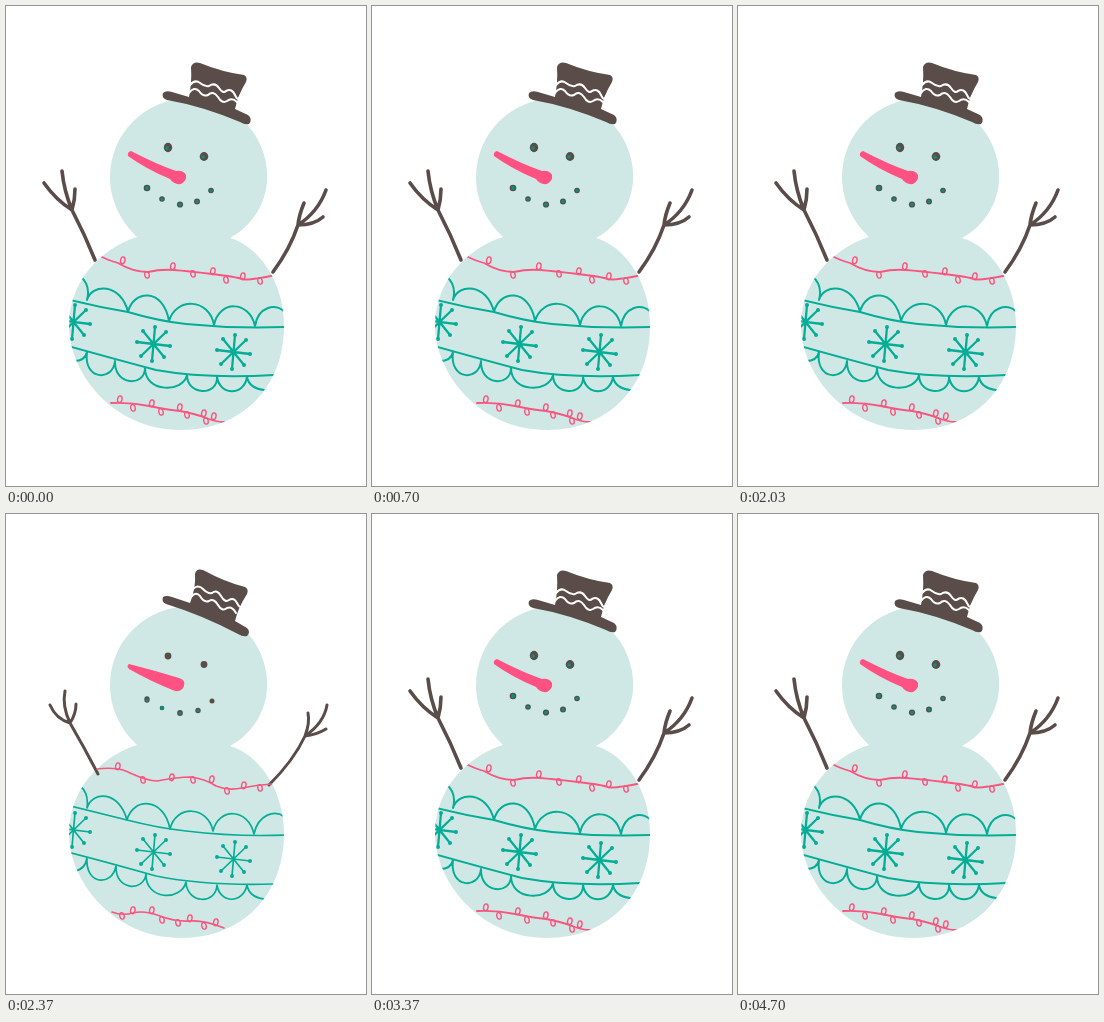
Animation, 360 px wide and 480 px high, one loop 5.03 s. Source, as an HTML page without scripts:

```html
<!DOCTYPE html>
<html lang="en">
<head>
<meta charset="utf-8">
<title>Snowman</title>
<style>
html, body { margin: 0; width: 100%; height: 100%; overflow: hidden; background: #fff; }
svg { display: block; width: 100vw; height: 100vh; }
path, .line { stroke-linecap: round; stroke-linejoin: round; }
.snow { fill: #cfe8e5; }
.dark { fill: #5a4c48; }
.pink { fill: #ff5283; }
.line { fill: none; }
.twig { stroke: #5a4c48; stroke-width: 3.6; }
.teal { stroke: #05ad97; stroke-width: 2; }
.string { stroke: #f9567f; stroke-width: 1.8; }
.loops { stroke: #f9567f; stroke-width: 1.4; }
.wave { stroke: #fff; stroke-width: 2; }
.glint { fill: #05917f; }
.a .flakes { stroke-width: 2.3; }
.b .twig { stroke-width: 3; }
.b .teal { stroke-width: 1.7; }
.b .string { stroke-width: 1.6; }

/* the two drawings swap about three times a second */
.a { animation: show-a 5.03s step-end infinite; }
.b { animation: show-b 5.03s step-end infinite; }
@keyframes show-a {
  0%, 13.917%, 27.237%, 40.358%, 53.678%, 66.998%, 80.119%, 93.439%, 100% { visibility: visible; }
  6.561%, 19.881%, 33.797%, 47.117%, 60.239%, 73.559%, 86.879% { visibility: hidden; }
}
@keyframes show-b {
  0%, 13.917%, 27.237%, 40.358%, 53.678%, 66.998%, 80.119%, 93.439%, 100% { visibility: hidden; }
  6.561%, 19.881%, 33.797%, 47.117%, 60.239%, 73.559%, 86.879% { visibility: visible; }
}
</style>
</head>
<body>
<svg viewBox="0 0 360 480">
  <defs>
    <path id="belly" d="M131 231C104 239 63 268 63 320C63 365 105 424 175 424C237 424 278 380 278 320C278 275 252 240 224 232Z"/>
    <clipPath id="inside"><use href="#belly"/></clipPath>
    <g id="flake">
      <path d="M2-16L-1 18M-16-1L17 3M-10-12L11 14M13-11L-12 13"/>
      <path stroke-width="4" d="M2-16h.01M-1 18h.01M-16-1h.01M17 3h.01M-10-12h.01M11 14h.01M13-11h.01M-12 13h.01"/>
    </g>
    <ellipse id="up" cx="1" cy="-4" rx="2.2" ry="3.4" transform="rotate(12)"/>
    <ellipse id="down" cx="0" cy="4" rx="2.2" ry="3.3" transform="rotate(-14)"/>
  </defs>

  <g class="snow">
    <path d="M131 231C115 216 104 195 104 171A78.6 78.6 0 0 1 261.200 171C261 197 246 220 224 232L180 250Z"/>
    <use href="#belly"/>
  </g>

  <g class="a">
    <g class="line twig">
      <path d="M89 254Q79 229 66 204Q50 194 38 177M66 204Q58 185 56 165M66 204Q69 194 69 183"/>
      <path d="M267 266Q284 243 292 219Q312 206 320 184M292 219Q293 209 298 197M292 219Q308 219 317 211"/>
    </g>
    <path class="dark" d="M185 61Q187 55 194 57Q216 66 238 69Q242 71 240 76Q232 89 229 103L242 109Q247 113 243 118Q239 119 234 116Q196 100 161 94Q155 92 157 87Q160 84 166 86L183 91Q186 76 185 61Z"/>
    <path class="line wave" d="M184 79Q189 73 194 77T203 80Q209 76 213 82T220 85Q226 82 229 89T234 90M183 87Q188 80 193 85Q197 91 202 89Q207 84 212 91Q216 98 221 95Q226 91 231 96"/>
    <path class="pink" d="M125 145Q121 146 122 150Q140 163 164 173Q168 179 175 178Q181 175 180 169Q177 164 170 165Q150 158 125 145Z"/>
    <g class="dark">
      <ellipse cx="162" cy="141.5" rx="4.2" ry="4.7"/>
      <ellipse cx="198" cy="150.5" rx="4.3" ry="4.4"/>
      <circle cx="141" cy="182" r="3.3"/>
      <circle cx="156" cy="193" r="2.8"/>
      <circle cx="174" cy="198.5" r="3.1"/>
      <circle cx="191" cy="195.5" r="3"/>
      <circle cx="205" cy="184.5" r="2.8"/>
    </g>
    <g class="glint">
      <circle cx="161" cy="142" r="1.8"/>
      <circle cx="197" cy="151" r="1.8"/>
      <circle cx="141" cy="182" r="1.9"/>
      <circle cx="156" cy="193" r="1.6"/>
      <circle cx="174" cy="198.5" r="1.8"/>
      <circle cx="191" cy="195.5" r="1.7"/>
      <circle cx="205" cy="184.5" r="1.6"/>
    </g>
    <g clip-path="url(#inside)">
      <g class="line teal">
        <path d="M60 293Q92 301 122 306Q152 315 180 318Q230 323 280 321"/>
        <path d="M74 270Q85 279 81 294C86 277 115 277 122 306C127 284 157 281 163 315C170 291 203 292 208 319C213 294 243 294 249 320C252 301 269 296 280 307"/>
        <path d="M62 340Q112 354 150 364Q200 373 268 369"/>
        <path d="M68 355Q79 355 81 346C77 374 107 376 109 355C108 380 139 381 139 362C139 387 177 387 181 369C181 390 212 390 211 371C214 390 238 390 241 371Q243 382 258 384"/>
        <g class="flakes">
          <use href="#flake" x="147" y="337"/>
          <use href="#flake" x="227" y="345"/>
          <use href="#flake" x="67" y="315"/>
        </g>
      </g>
      <g class="line string">
        <path d="M94 250Q104 255 112 257C122 263 130 266 142 266Q155 263 168 264T206 268T236 273T270 269"/>
        <path d="M105 397Q124 396 143 400T174 405Q190 408 200 412T218 416"/>
      </g>
      <g class="line loops">
        <use href="#up" x="115" y="258"/><use href="#down" x="140" y="265"/>
        <use href="#up" x="165" y="264"/><use href="#down" x="186" y="264"/>
        <use href="#up" x="205" y="269"/><use href="#down" x="219" y="270"/>
        <use href="#up" x="235" y="274"/><use href="#down" x="253" y="271"/>
        <use href="#up" x="112" y="397"/><use href="#down" x="126" y="398"/>
        <use href="#up" x="144" y="401"/><use href="#down" x="154" y="402"/>
        <use href="#up" x="172" y="405"/><use href="#down" x="180" y="405"/>
        <use href="#up" x="196" y="411"/><use href="#up" x="206" y="414"/>
        <use href="#down" x="199" y="411"/>
      </g>
    </g>
  </g>

  <g class="b">
    <g class="line twig">
      <path d="M92 260Q78 233 64 209Q50 205 44 191M64 209Q56 192 59 177M64 209Q70 200 70 190"/>
      <path d="M263 271Q288 246 299 222Q318 209 321 191M299 222Q304 209 302 199M299 222Q310 221 320 215"/>
    </g>
    <path class="dark" d="M189 60Q190 54 197 56Q219 68 239 73Q243 75 241 80Q232 94 229 107L241 114Q245 118 241 122Q237 123 232 120Q196 101 160 90Q155 88 157 83Q160 81 166 83L184 89Q190 74 189 60Z"/>
    <path class="line wave" d="M187 75Q192 70 197 75T206 79Q211 75 215 82T223 86Q228 83 231 89T236 92M185 83Q190 77 194 82Q198 89 203 87Q208 84 212 91Q216 98 221 94Q226 92 230 99"/>
    <path class="pink" d="M123 150Q120 152 123 155Q146 168 169 177Q176 178 178 172Q180 166 173 164Q147 156 123 150Z"/>
    <g class="dark">
      <circle cx="162" cy="142" r="3.4"/>
      <circle cx="198" cy="150.5" r="3.4"/>
      <ellipse cx="141" cy="185.5" rx="2.7" ry="3.2"/>
      <circle cx="156" cy="194" r="2.3"/>
      <circle cx="174" cy="199" r="2.9"/>
      <circle cx="192" cy="196.5" r="2.7"/>
      <circle cx="206" cy="187" r="2.5"/>
    </g>
    <g class="glint">
      <circle cx="141" cy="186" r="1.5"/>
      <circle cx="156" cy="194" r="2"/>
      <circle cx="174" cy="199" r="1.5"/>
      <circle cx="192" cy="196.5" r="1.5"/>
    </g>
    <g clip-path="url(#inside)">
      <g class="line teal">
        <path d="M60 291Q92 299 121 306Q152 314 180 317Q230 323 280 321"/>
        <path d="M74 272Q83 279 81 294C86 277 113 276 121 306C127 283 158 283 164 315C170 290 202 292 207 317C213 293 242 294 248 320C252 301 269 294 280 304"/>
        <path d="M62 338Q112 351 150 362Q200 372 268 370"/>
        <path d="M68 357Q79 356 81 344C79 371 106 373 110 352C109 377 138 378 140 360C139 386 175 388 180 368C181 390 210 391 211 371C214 390 237 390 241 371Q243 383 258 385"/>
        <use href="#flake" x="147" y="337"/>
        <use href="#flake" x="227" y="344"/>
        <use href="#flake" x="67" y="315"/>
      </g>
      <g class="line string">
        <path d="M90 255Q107 253 117 256C128 260 138 267 151 267Q172 263 184 263Q200 265 210 272Q222 277 236 274T266 270"/>
        <path d="M106 398Q116 402 127 399T154 402T184 407T218 414"/>
      </g>
      <g class="line loops">
        <use href="#up" x="110" y="256"/><use href="#down" x="136" y="262"/>
        <use href="#up" x="164" y="267"/><use href="#down" x="186" y="262"/>
        <use href="#up" x="204" y="269"/><use href="#down" x="220" y="273"/>
        <use href="#up" x="236" y="275"/><use href="#down" x="253" y="270"/>
        <use href="#down" x="115" y="398"/><use href="#up" x="125" y="400"/>
        <use href="#up" x="144" y="400"/><use href="#down" x="155" y="402"/>
        <use href="#down" x="171" y="405"/><use href="#up" x="182" y="408"/>
        <use href="#down" x="197" y="408"/><use href="#up" x="208" y="412"/>
      </g>
    </g>
  </g>
</svg>
</body>
</html>
```
